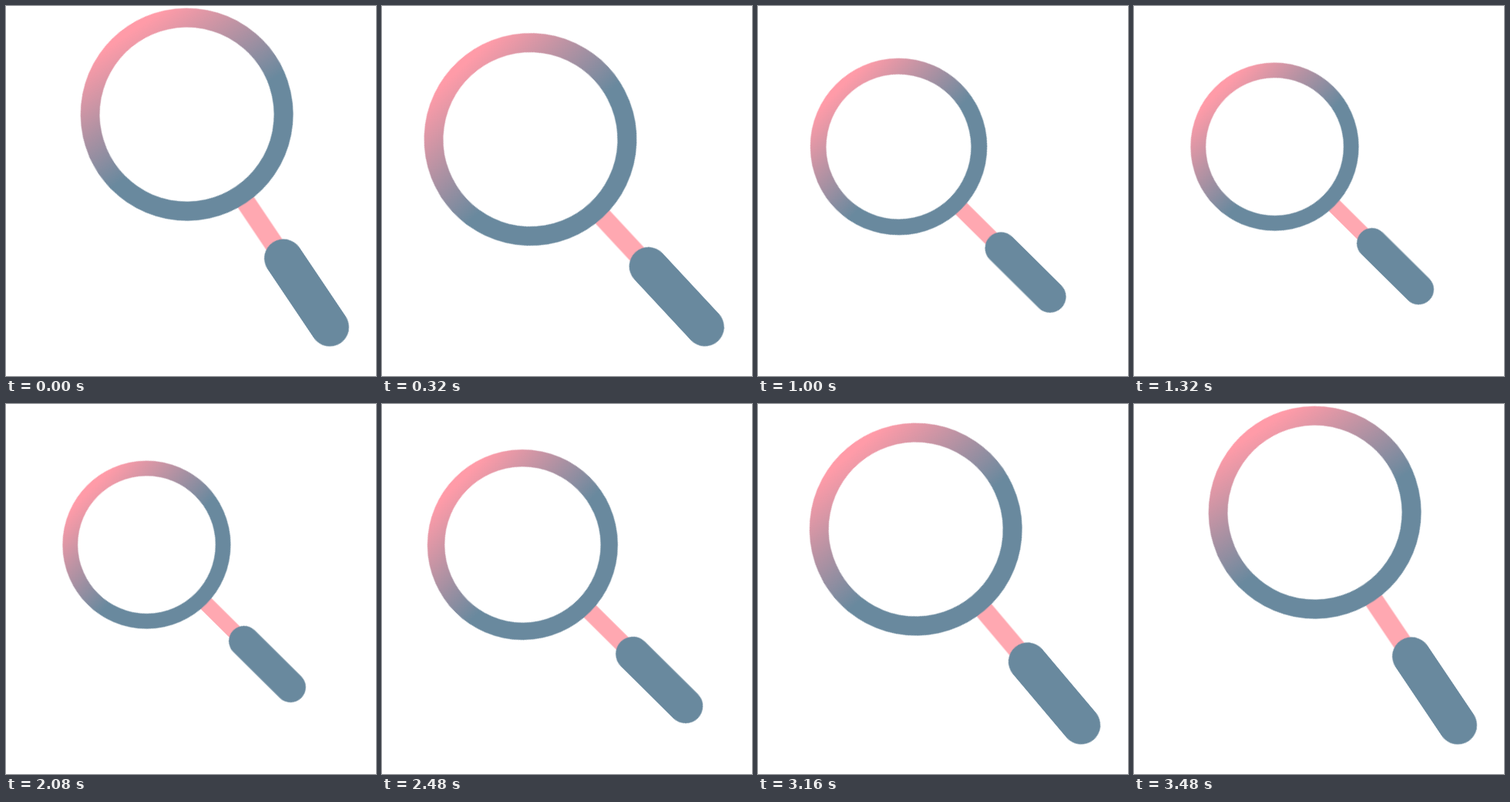
Write an HTML page that moves like this. It is 480 by 480 pixels and loops after 4.24 s.

```html
<!DOCTYPE html>
<html lang="en">
<head>
<meta charset="utf-8">
<title>Magnifying glass</title>
<style>
  html, body {
    margin: 0;
    width: 100%;
    height: 100%;
    overflow: hidden;
    background: #fff;
  }
  svg {
    display: block;
    width: 100vw;
    height: 100vh;
  }
  .zoom {
    transform-origin: 182.7px 182.8px;
    animation: zoom 4240ms linear infinite;
  }
  .swing {
    transform-origin: 0 0;
    animation: swing 4240ms linear infinite;
  }
  @keyframes swing {
    0% { transform: translate(420px, 416.6px) rotate(56.1deg); }
    0.4% {
      transform: translate(420px, 416.6px) rotate(56.1deg);
      animation-timing-function: ease;
    }
    15% { transform: translate(418.6px, 416.4px) rotate(44.72deg); }
    67.7% {
      transform: translate(418.6px, 416.4px) rotate(44.72deg);
      animation-timing-function: ease-in-out;
    }
    82.3%, 100% { transform: translate(420px, 416.6px) rotate(56.1deg); }
  }
  @keyframes zoom {
    0% { transform: scale(1); }
    14.4% {
      transform: scale(1);
      animation-timing-function: ease;
    }
    32.8% { transform: scale(.79); }
    48.6% {
      transform: scale(.79);
      animation-timing-function: ease-in-out;
    }
    68.4%, 100% { transform: scale(1); }
  }
</style>
</head>
<body>
<svg viewBox="0 0 480 480">
  <defs>
    <linearGradient id="rim" gradientUnits="userSpaceOnUse" x1="-462" y1="0" x2="-308" y2="0">
      <stop offset="0" stop-color="#ff9ba8"/>
      <stop offset="1" stop-color="#69899e"/>
    </linearGradient>
  </defs>
  <!-- Drawn along the x axis, with the grip's far end at the origin -->
  <g class="zoom">
    <g class="swing" fill="none">
      <path d="M-212 0H-107" stroke="#ffa8b1" stroke-width="25"/>
      <circle cx="-332.4" r="125.5" stroke="url(#rim)" stroke-width="25"/>
      <path d="M-107.5 0H0" stroke="#69899e" stroke-width="50" stroke-linecap="round"/>
    </g>
  </g>
</svg>
</body>
</html>
```
